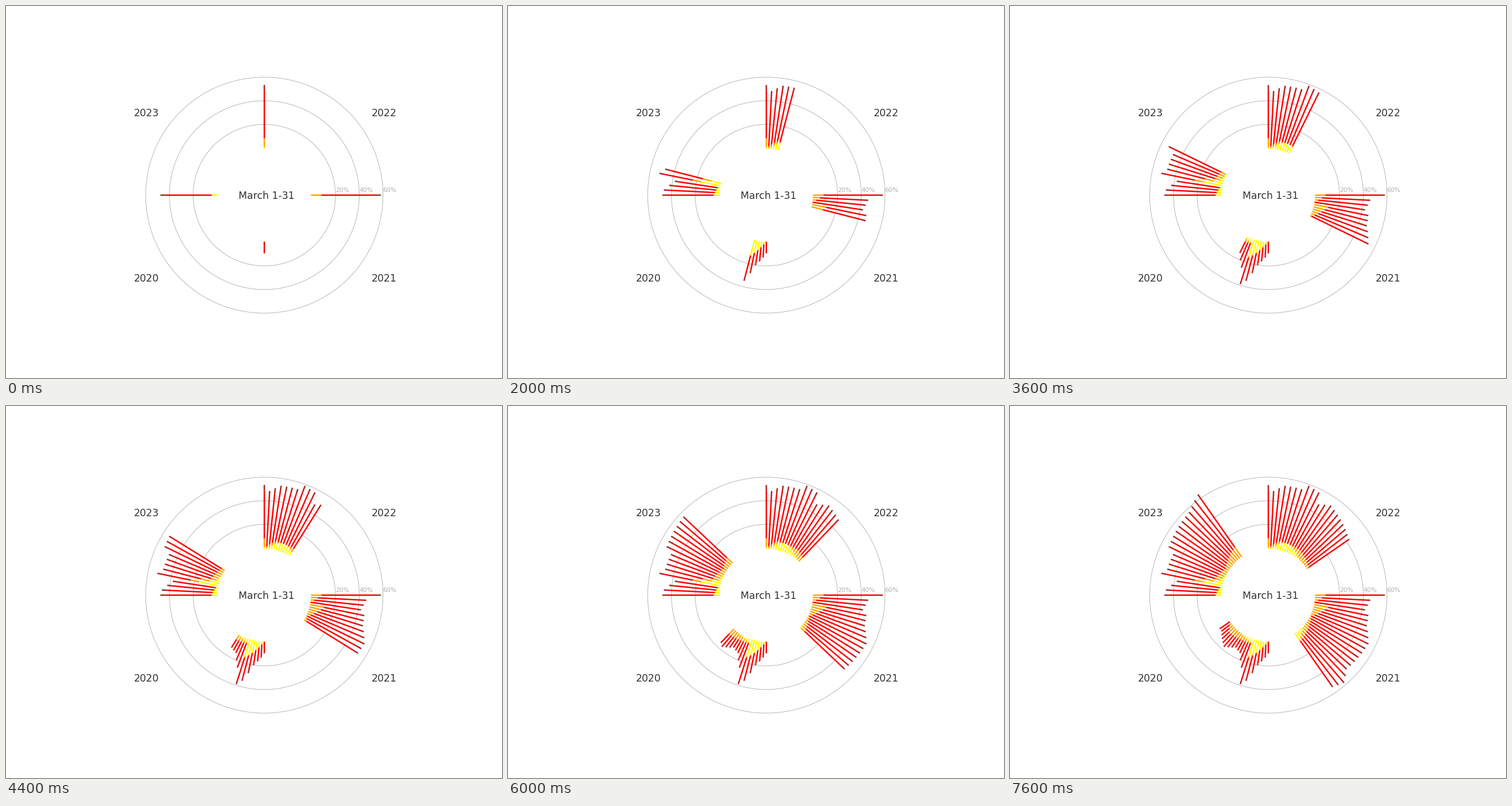
Recreate the animation shown at these times as a matplotlib script. Size 864 by 648 pixels, loop 8000 ms.

```python
import numpy as np
import matplotlib.pyplot as plt
from matplotlib.animation import FuncAnimation
from matplotlib.collections import LineCollection
from matplotlib.patches import Ellipse

DAYS_SHOWN, DAYS_IN_MONTH = 20, 31
CX, CY = 450, 329.5
SX, SY = 2.067, 2.055          # pixels per percent
INNER = 39.4
CAP_SHARE = 0.09               # dark tip as a share of the bar
COLORS = ["yellow", "orange", "red", "firebrick"]
TEXT, GRID = "#333333", "#b0b0b0"

# Clockwise from the top. Per year: key points (day, outer radius),
# key points (day, depth of yellow plus orange), day richest in yellow
YEARS = {
    "2022": ([(0, 93.4), (1, 88.4), (3, 93.8), (6, 94.2), (7, 98.8),
              (9, 97), (10, 88), (12, 92.5), (19, 83)],
             [(0, 8.8), (1, 2), (4, 7), (12, 7), (19, 2)], 7),
    "2021": ([(0, 98.2), (1, 86), (3, 82.4), (4, 86), (6, 87),
              (9, 94), (15, 91), (17, 98), (19, 94.8)],
             [(0, 8.7), (3, 0), (4, 12), (9, 1), (19, 8)], 21),
    "2020": ([(0, 49.4), (3, 60), (5, 75), (6, 79), (7, 65.5),
              (9, 54.6), (11, 52.3), (14, 57.6), (18, 50)],
             [(0, 0), (6, 16), (7, 4), (16, 6), (19, 0)], 4.5),
    "2023": ([(0, 87.6), (1, 86.5), (3, 78), (4, 92), (5, 88),
              (8, 87.5), (9, 93.5), (16, 97), (19, 104)],
             [(0, 5), (3, 2), (4, 24), (6, 7.5), (11, 3), (19, 10)], 1),
}


def curve(day, points):
    return np.interp(day, *np.transpose(points))


def point(radius, angle):
    return CX + SX * radius * np.sin(angle), CY - SY * radius * np.cos(angle)


def day_segments(day):
    """Coloured pieces of the four bars of one day."""
    pieces = []
    for quarter, (tips, depths, yellow_day) in enumerate(YEARS.values()):
        angle = np.pi / 2 * (quarter + day / DAYS_IN_MONTH)
        tip, depth = curve(day, tips), curve(day, depths)
        yellow = depth * np.exp(-((day - yellow_day) / 5) ** 2)
        edges = [INNER, INNER + yellow, INNER + depth,
                 tip - CAP_SHARE * (tip - INNER), tip]
        for low, high, color in zip(edges, edges[1:], COLORS):
            if high > low:
                pieces.append(([point(low, angle), point(high, angle)], color))
    return pieces


plt.rcParams["font.family"] = "DejaVu Sans"
fig = plt.figure(figsize=(12, 9), dpi=72, facecolor="white")
ax = fig.add_axes([0, 0, 1, 1])
ax.set(xlim=(0, 864), ylim=(648, 0))
ax.axis("off")

for percent in (20, 40, 60):
    radius = 40 + percent
    ax.add_patch(Ellipse((CX, CY), 2 * SX * radius, 2 * SY * radius,
                         fill=False, ec=GRID, lw=0.9, zorder=1))
    ax.text(CX + SX * radius, CY - 5.7, f"{percent}%", size=10.8, color=GRID)


def label(text, x, y):
    ax.text(x, y + 6.4, text, size=17.28, color=TEXT, ha="center")


label("March 1-31", CX + 4.2, CY)
for year, right, down in [("2022", 1, -1), ("2021", 1, 1),
                          ("2020", -1, 1), ("2023", -1, -1)]:
    label(year, CX + 1.7 + right * 100 * SX, CY + down * 70 * SY)

bars = LineCollection([], linewidths=2.5, capstyle="butt", zorder=2)
bars.set_snap(False)
ax.add_collection(bars, autolim=False)


def update(frame):
    pieces = [p for day in range(frame + 1) for p in day_segments(day)]
    bars.set_segments([line for line, _ in pieces])
    bars.set_color([color for _, color in pieces])
    return [bars]


anim = FuncAnimation(fig, update, frames=DAYS_SHOWN, interval=400,
                     repeat=True, repeat_delay=0)
plt.show()
```
